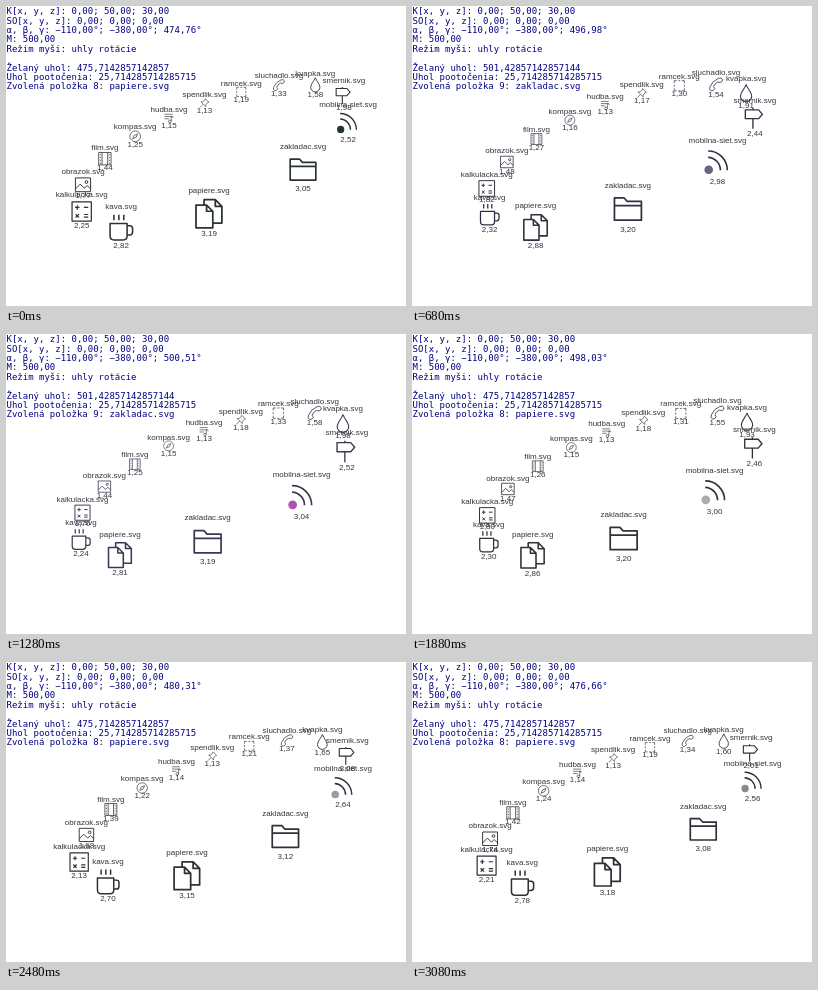
Write an HTML page with a canvas that moves like this. It is 400 px wide and 300 px high and loops after 3.6 s.

```html
<!DOCTYPE html>
<html lang="sk">
<meta charset="utf-8">
<title>Kruhová ponuka ikon</title>
<style>
html, body { margin: 0; width: 100%; height: 100%; overflow: hidden; background: #fff }
canvas { display: block }
</style>
<canvas id="stage" width="400" height="300"></canvas>
<script>
const ctx = document.getElementById('stage').getContext('2d');
const LOOP = 3600, TICK = 40, STEP = 360 / 14, EASE = 0.9;

// Outlines on a grid from -12 to 12, in ring order
const icons = [
  ['ramcek', 'M-10-5V-10H-5M5-10H10V-5M10 5V10H5M-5 10H-10V5M-2-10H2M-2 10H2M-10-2V2M10-2V2'],
  ['spendlik', 'M2-10L10-2L7-1L3 4L3 8L-8-3L-4-3L1-7ZM-3 3L-10 10'],
  ['hudba', 'M-10-8H8M-10-3H8M-10 2H0M5 8V-3L10-1M5 8A3 3 0 1 1 -1 8A3 3 0 1 1 5 8'],
  ['kompas', 'M11 0A11 11 0 1 1 -11 0A11 11 0 1 1 11 0M5-5L2 2L-5 5L-2-2Z'],
  ['film', 'M-11-11H11V11H-11ZM-5-11V11M5-11V11M-8-8V-6M-8-3V-1M-8 2V4M-8 7V9M8-8V-6M8-3V-1M8 2V4M8 7V9'],
  ['obrazok', 'M-11-10H11V10H-11ZM-11 6L-4-1L2 5L6 1L11 6M7-4A2 2 0 1 1 3-4A2 2 0 1 1 7-4'],
  ['kalkulacka', 'M-11-11H11V11H-11ZM-7.5-4.5H-2.5M-5-7V-2M2.5-4.5H7.5M-7 3L-3 7M-3 3L-7 7M2.5 3.5H7.5M2.5 6.5H7.5'],
  ['kava', 'M-10-3.5H5.5V8Q5.5 11.5 2 11.5H-6.5Q-10 11.5-10 8ZM5.5-1.5H8Q10.5-1.5 10.5 1V4Q10.5 7 8 7H5.5M-6.5-11.5V-6.5M-2-11.5V-6.5M2.5-11.5V-6.5'],
  ['papiere', 'M-10.5-7H-2L3-2V11.3H-10.5ZM-2-7V-2H3M-4-7V-11.3H5L10.3-6V7.5H3M5-11.3V-6H10.3'],
  ['zakladac', 'M-10.8 9V-8.8H-3L-.5-6H10.8V9ZM-10.8-2.6H10.8'],
  ['mobilna-siet', 'M-8-10A16.5 16.5 0 0 1 8.5 6.5M-8-4.5A11 11 0 0 1 2.5 6.5'],
  ['smernik', 'M-10-9H4L8-4.3L4 .3H-10ZM-2 .3V11M-2-11V-9'],
  ['kvapka', 'M0-11.5C2-6 7.5-1 7.5 4A7.5 7.5 0 0 1 -7.5 4C-7.5-1-2-6 0-11.5Z'],
  ['sluchadlo', 'M4-10Q9-12 11-8Q11-4 7-3L3-4Q-3-1-4 4L-2 7Q-4 11-8 11Q-12 9-10 4Q-6-6 4-10Z']
].map(([name, d]) => ({ name: name + '.svg', path: new Path2D(d) }));
const dot = new Path2D('M-3.8 6.2A3.7 3.7 0 1 1 -11.2 6.2A3.7 3.7 0 1 1 -3.8 6.2');

// time, line colour, dot colour
const tints = [
  [0, [43, 50, 50], [36, 52, 50]],
  [440, [48, 48, 50], [54, 54, 58]],
  [920, [54, 46, 84], [162, 138, 192]],
  [1280, [62, 54, 84], [176, 80, 178]],
  [1840, [62, 54, 84], [176, 80, 178]],
  [1880, [50, 50, 54], [172, 172, 174]],
  [2160, [50, 50, 54], [168, 168, 172]],
  [2480, [47, 47, 55], [154, 154, 168]],
  [3080, [47, 47, 55], [136, 136, 144]],
  [LOOP, [47, 47, 55], [136, 136, 144]]
];

const num = v => v.toFixed(2).replace('.', ',');

function tint(t, col) {
  const i = tints.findIndex(k => k[0] > t), a = tints[i - 1], b = tints[i];
  const f = (t - a[0]) / (b[0] - a[0]);
  return `rgb(${a[col].map((v, j) => Math.round(v + (b[col][j] - v) * f))})`;
}

// Each tick removes a tenth of the angle still to go
function pose(n) {
  const low = 270 + 8 * STEP, high = low + STEP;
  if (n < 1) return { gamma: low - 0.954, goal: low, pick: 8 };
  const up = high - (STEP + 0.954) * EASE ** Math.min(n, 32);
  if (n < 47) return { gamma: up, goal: high, pick: 9 };
  return { gamma: low + (up - low) * EASE ** Math.min(n - 46, 31), goal: low, pick: 8 };
}

function place(icon, i, gamma) {
  const a = (468.61 - gamma + STEP * (i - 8)) * Math.PI / 180;
  const c = Math.cos(a), s = Math.sin(a);
  const scale = 250 / (150 - 0.006 * (500.5 - gamma) - 71.95 * c);
  const drift = -0.2 - 0.015 * (gamma - 475);
  return {
    ...icon, scale,
    x: 200 + scale * (8.8 * c + 70.9 * s + drift),
    y: 126 + scale * (22.8 * c - 27.4 * s)
  };
}

function drawItem(p, ink, dotInk) {
  const k = p.scale * 0.39;
  ctx.save();
  ctx.translate(p.x, p.y);
  ctx.scale(k, k);
  ctx.lineWidth = 1.4;
  ctx.lineJoin = 'round';
  ctx.strokeStyle = ink;
  ctx.stroke(p.path);
  if (p.name.startsWith('mobilna')) {
    ctx.fillStyle = dotInk;
    ctx.fill(dot);
  }
  ctx.restore();
  ctx.fillStyle = '#35353d';
  ctx.fillText(p.name, p.x, p.y + 2.4 - 7.4 * p.scale);
  ctx.fillText(num(p.scale), p.x, p.y + 2.4 + 6.36 * p.scale);
}

function drawInfo({ gamma, goal, pick }) {
  ctx.font = '9px "DejaVu Sans Mono", monospace';
  ctx.textAlign = 'left';
  ctx.fillStyle = '#000080';
  [
    'K[x, y, z]: 0,00; 50,00; 30,00',
    'SO[x, y, z]: 0,00; 0,00; 0,00',
    `α, β, γ: −110,00°; −380,00°; ${num(gamma)}°`,
    'M: 500,00',
    'Režim myši: uhly rotácie',
    '',
    'Želaný uhol: ' + (pick === 8 ? '475,7142857142857' : '501,42857142857144'),
    'Uhol pootočenia: 25,714285714285715',
    `Zvolená položka ${pick}: ${icons[pick].name}`
  ].forEach((line, i) => ctx.fillText(line, 0.5, 8.3 + 9.37 * i));
}

function draw(now) {
  const n = Math.floor((now % LOOP) / TICK), t = n * TICK, state = pose(n);
  ctx.fillStyle = '#fff';
  ctx.fillRect(0, 0, 400, 300);
  ctx.font = '8px "Liberation Sans", Arial, sans-serif';
  ctx.textAlign = 'center';
  const ink = tint(t, 1), dotInk = tint(t, 2);
  icons.map((icon, i) => place(icon, i, state.gamma))
    .sort((a, b) => a.scale - b.scale)
    .forEach(p => drawItem(p, ink, dotInk));
  drawInfo(state);
}

const start = performance.now();
function loop() {
  draw(performance.now() - start);
  requestAnimationFrame(loop);
}
loop();
</script>
</html>
```
